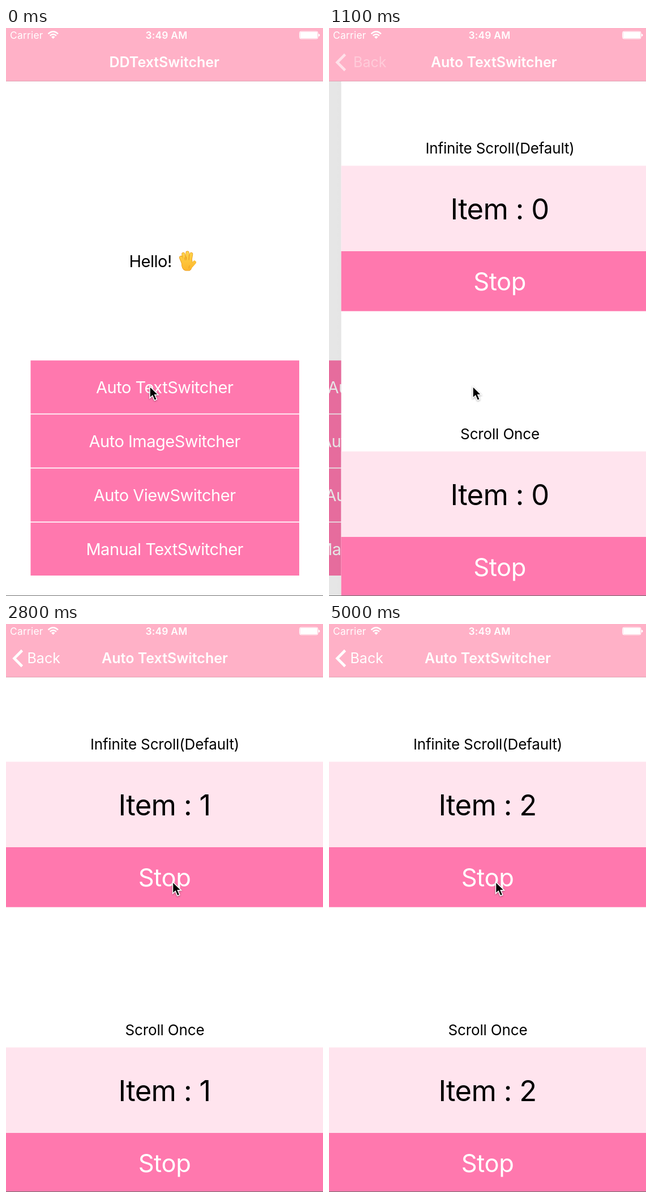
Write an HTML page that moves like this. It is 560x1000 px and loops after 5100 ms.

```html
<!DOCTYPE html>
<html lang="en">
<head>
<meta charset="utf-8">
<title>Text switcher demo</title>
<style>
  html, body { margin: 0; width: 100%; height: 100%; overflow: hidden; background: #fff; }
  svg { display: block; width: 100%; height: 100%; }
  text { font-family: Inter, Roboto, "Open Sans", sans-serif; white-space: pre; }
  .mid { text-anchor: middle; }
  .white { fill: #fff; }
  .status { font-size: 17.4px; letter-spacing: .014em; }
  .bold { font-weight: 600; }
  .nav { font-size: 25px; }
  .menu { font-size: 29px; letter-spacing: -.017em; }
  .label { font-size: 26px; letter-spacing: -.006em; }
  .item { font-size: 50.7px; letter-spacing: -.013em; }
  .stop { font-size: 43.5px; letter-spacing: -.01em; }
</style>
</head>
<body>
<svg viewBox="0 0 560 1000" preserveAspectRatio="none">
  <defs>
    <linearGradient id="edge">
      <stop offset="0" stop-opacity="0"/>
      <stop offset="1" stop-opacity=".16"/>
    </linearGradient>
    <linearGradient id="skin" x1="0" y1="-17" x2="0" y2="18" gradientUnits="userSpaceOnUse">
      <stop offset="0" stop-color="#ffd54a"/>
      <stop offset="1" stop-color="#fdb52b"/>
    </linearGradient>
    <clipPath id="pane"><rect width="560" height="150.5"/></clipPath>
    <g id="fingers">
      <path d="M-8 3L-12-6M-5-1L-7.5-12M0-2V-14.500M5-1L7-12"/>
      <path d="M5 11L13 2.500" stroke-width="6"/>
      <path d="M-8 3Q-8 13-3 14H3Q7 12 6 0Z"/>
    </g>
  </defs>

  <rect width="560" height="1000" fill="#fff"/>

  <g id="home">
    <g id="hello">
      <text class="menu" x="217.500" y="332">Hello!</text>
      <g transform="translate(320.500 321) scale(.95 1)" stroke-linecap="round" stroke-linejoin="round">
        <use href="#fingers" fill="#e89a1f" stroke="#e89a1f" stroke-width="6.600"/>
        <use href="#fingers" fill="url(#skin)" stroke="url(#skin)" stroke-width="5"/>
        <path d="M-4.300-1.500L-5.300-6M-1.800-2.500L-2.300-7M2.700-2L3-7M4 8Q2 10 3 13" fill="none" stroke="#e89a1f" stroke-width="1"/>
      </g>
    </g>
    <g id="menu"></g>
  </g>
  <rect id="dim" width="560" height="1000"/>

  <g id="detail">
    <rect id="shadow" x="-10" width="10" height="1000" fill="url(#edge)"/>
    <rect width="560" height="1000" fill="#fff"/>
    <g id="panes"></g>
  </g>

  <rect width="560" height="93.500" fill="#ffb1c7"/>
  <rect y="93" width="560" height="1" fill="#dfa3b4"/>
  <text class="status white" x="7" y="19">Carrier</text>
  <g fill="none" stroke="#fff" stroke-width="2.400">
    <path d="M74.500 10.300Q83.300 2.300 92 10.300M77.700 13.500Q83.300 8.500 88.900 13.500"/>
    <path d="M83.300 19L80 15.700Q83.300 13 86.600 15.700Z" fill="#fff" stroke="none"/>
  </g>
  <text class="status white bold mid" x="283.500" y="19">3:49 AM</text>
  <rect x="518.500" y="6" width="32.500" height="13" rx="2.500" fill="none" stroke="#fff"/>
  <rect x="519.500" y="7" width="30.500" height="11" rx="1" fill="#fff"/>
  <path d="M552 10q2.500.5 2.500 2.500t-2.500 2.500z" fill="#fff"/>
  <text id="title" class="nav white bold" y="69"></text>
  <text id="next" class="nav white bold mid" y="69">Auto TextSwitcher</text>
  <path id="chevron" d="M28.500 46.500L14.500 60.500L28.500 74.500" fill="none" stroke="#fff" stroke-width="4.600"/>
  <text id="back" class="nav white" y="69">Back</text>

  <rect y="999" width="560" height="1" fill="#707070"/>
  <path id="cursor" d="M0 0V20.500L4.700 16.300L8.300 24.600L12.300 22.800L8.800 14.800H15Z" stroke="#fff" stroke-width="1.500"
        style="filter:drop-shadow(0 1.500px 1.500px rgba(0,0,0,.35))"/>
</svg>

<script>
const LOOP = 5100, TICK = 100;
const $ = id => document.getElementById(id);
const clamp = v => Math.min(1, Math.max(0, v));
const ramp = (t, a, b) => clamp((t - a) / (b - a));
const mix = (a, b, p) => a + (b - a) * p;
const move = (el, x, y) => el.setAttribute('transform', `translate(${x} ${y})`);
const fade = (el, v) => el.setAttribute('opacity', v);

// Same curve as CSS ease-in-out
function ease(x) {
  let lo = 0, hi = 1;
  for (let i = 0; i < 24; i++) {
    const s = (lo + hi) / 2, r = 1 - s;
    if (1.26 * r * r * s + 1.74 * r * s * s + s ** 3 < x) lo = s; else hi = s;
  }
  return lo * lo * (3 - 2 * lo);
}

// Distance left of a critically damped spring
function springLeft(ms) {
  const k = 0.01826 * Math.max(0, ms);
  return (1 + k) * Math.exp(-k);
}

$('menu').innerHTML = ['Auto TextSwitcher', 'Auto ImageSwitcher', 'Auto ViewSwitcher', 'Manual TextSwitcher']
  .map((name, i) => `<rect x="43.500" y="${585.3 + i * 95.1}" width="474.500" height="93.400" fill="#ff78ae"/>
    <text class="menu white mid" x="280.200" y="${642.5 + i * 95.1}">${name}</text>`).join('');

$('panes').innerHTML = [['Infinite Scroll(Default)', 242.5], ['Scroll Once', 745.5]]
  .map(([name, y]) => `<g transform="translate(0 ${y})">
    <text class="label mid" x="280.500" y="-22">${name}</text>
    <rect width="560" height="150.500" fill="#ffe4ee"/>
    <g clip-path="url(#pane)"><g class="reel">${[0, 1, 2].map(n =>
      `<text class="item mid" x="280" y="${94.7 + n * 150.5}">Item : ${n}</text>`).join('')}</g></g>
    <rect y="150.500" width="560" height="105.500" fill="#ff78ae"/>
    <text class="stop white mid" x="280" y="219.500">Stop</text></g>`).join('');

const reels = document.querySelectorAll('.reel');
const pressed = document.querySelector('#menu text');

function draw(t) {
  move($('hello'), 0, 220 * (1 - ease(ramp(t, -555, 445))));
  fade(pressed, t < 700 ? 1 : mix(.2, 1, ramp(t, 820, 1070)));

  const pushing = t >= 800;
  const left = t < 1500 ? springLeft(t - 823) : 0;
  move($('home'), -168 * (1 - left), 0);
  fade($('dim'), .1 * (1 - left));
  fade($('shadow'), left);
  move($('detail'), 560 * left, 0);
  $('detail').setAttribute('visibility', pushing ? 'visible' : 'hidden');

  const labelX = 37.5 + 145 * left;
  $('title').textContent = pushing ? 'Ba...' : 'DDTextSwitcher';
  $('title').setAttribute('x', labelX);
  fade($('title'), 1 - ramp(t, 810, 1000));
  $('back').setAttribute('x', labelX);
  fade($('back'), ramp(t, 1000, 1300));
  fade($('chevron'), ramp(t, 800, 1300));
  $('next').setAttribute('x', 280.5 + 280 * left);
  fade($('next'), ramp(t, 810, 1050));

  const turn = ease(ramp(t, 1786, 2786)) + ease(ramp(t, 3786, 4786));
  reels.forEach(r => move(r, 0, -150.5 * turn));

  const go = ease(ramp(t, 1550, 2100)), nudge = ramp(t, 2200, 2500);
  move($('cursor'), 254 + 37.5 * go + 3 * nudge, 631 - 172 * go - 5 * nudge);
}

// The screen refreshes ten times a second
const start = performance.now();
function frame() {
  const t = (performance.now() - start + 8) % LOOP;
  draw(Math.floor(t / TICK) * TICK);
  requestAnimationFrame(frame);
}
frame();
</script>
</body>
</html>
```
